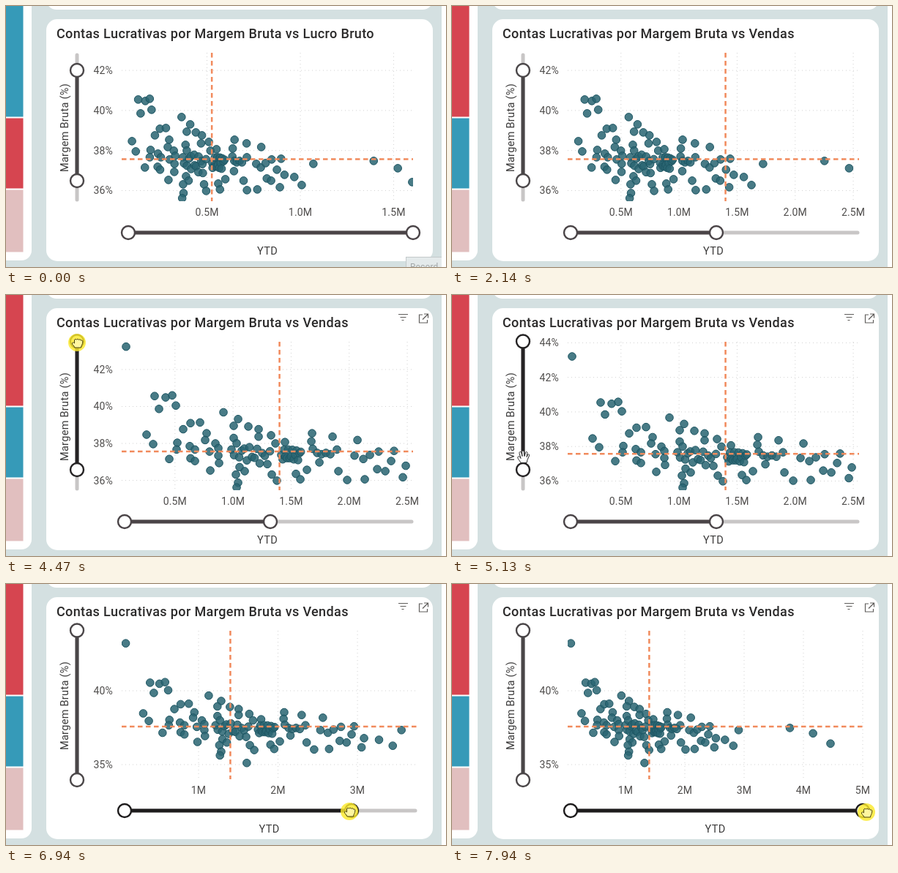
Write an HTML page that moves like this. It is 601 by 357 pixels and loops after 8 s.

```html
<!DOCTYPE html>
<html lang="pt">
<head>
<meta charset="utf-8">
<title>Contas Lucrativas</title>
<style>
html, body { margin: 0; width: 601px; height: 357px; overflow: hidden; background: #fff; }
svg { display: block; font: 14px Roboto, "Noto Sans", sans-serif; fill: #4f4d4c; letter-spacing: .15px; }
.title { font-size: 18px; font-weight: 500; letter-spacing: .36px; fill: #2b2a2a; }
.name { font-size: 14.5px; letter-spacing: .3px; fill: #3c3b3b; }
.grid { stroke: #d2d2d2; stroke-dasharray: 1 4; }
.mean { stroke: #f18a5c; stroke-width: 2.5; stroke-dasharray: 6.5 4.5; }
.rail { stroke: #c8c6c6; stroke-width: 5; stroke-linecap: round; }
.range { stroke-width: 5; }
.handle { fill: #fff; stroke-width: 2.4; }
.dot { fill: #2a6572; fill-opacity: .86; stroke: #1e5663; }
</style>
</head>
<body>
<svg width="601" height="357" viewBox="0 0 601 357">
  <defs><clipPath id="plot"><rect id="plotBox" x="158" y="64" width="398" height="203"/></clipPath></defs>
  <rect width="595" height="357" fill="#d4e0e1"/>
  <g fill="#fff">
    <rect x="-30" y="-30" width="65" height="378" rx="14"/>
    <rect x="55" y="-40" width="528" height="45" rx="14"/>
    <rect x="55" y="18" width="528" height="331" rx="15"/>
  </g>
  <rect id="tileA" width="23.5" height="151.5"/>
  <rect id="tileB" y="153.5" width="23.5" height="96"/>
  <rect y="251.5" width="23.5" height="85" fill="#e1bfbf"/>
  <text id="title" class="title" x="69" y="44"/>
  <g id="axes"></g>
  <g id="dots" clip-path="url(#plot)"></g>
  <g id="means"></g>
  <text class="name" text-anchor="middle" transform="translate(85 166.500) rotate(-90)">Margem Bruta (%)</text>
  <text id="xName" class="name" text-anchor="middle" y="340">YTD</text>
  <g id="sliders"></g>
  <g id="icons" fill="none" stroke="#605e5c" stroke-width="1.2">
    <path d="M536 26.500h13M538.500 30.500h8M540.500 34.500h3"/>
    <path d="M569 27h-4.500v11h11v-4M571 26h5.500v5.500M576 26.500l-7 7"/>
  </g>
  <g id="hint">
    <rect x="546.5" y="343.500" width="60" height="22" fill="#e4eaeb" stroke="#c3c9ca"/>
    <text x="552" y="361" font-size="12" fill="#a3a8a9">Record</text>
    <rect x="595" y="340" width="6" height="17" fill="#fff"/>
  </g>
  <g id="cursor">
    <circle id="press" r="12" fill="#fbe92c" fill-opacity=".82"/>
    <path id="arrow" d="M0 0v16.500l3.800-3.600 2.700 6.200 2.600-1.100-2.700-6.100h5.300z" fill="#fff" stroke="#222" stroke-linejoin="round"/>
    <path id="openHand" d="M-3 9C-5 5-8 3-7 1s3 0 4 2L-5-4c-.6-2 2-3 2.700-1L-1 0-1.500-6c0-2 2.600-2 2.800 0L2 0 3.500-5c.6-2 2.800-1 2.400.8L5 1 6.500-2c1-1.500 2.700-.5 2 1.200L6 5 5 9z" fill="#fff" stroke="#222"/>
    <path id="fist" d="M-3 7C-4 4-7 3-6.500 1s2-1 3 0V-3c0-2 2.500-2 3-.7 .5-1.600 2.600-1.400 3 .2 .8-1.400 2.600-.8 2.800.7 1.500-.8 2.700 0 2.500 1.800C7.700 3 5.500 4 5.500 7z" fill="#fff6a0" stroke="#4a430c"/>
  </g>
</svg>
<script>
const LOOP = 8000, FRAME = 200 / 3, SHIFT = 250;
const LEFT = 158, TOP = 64, BOTTOM = 267;
const MEAN_SALES = 1.4, MEAN_MARGIN = 37.57;
const $ = id => document.getElementById(id);

// Each view takes over at time t: axes jump, dots glide for SHIFT ms.
const firstView = { t: 0, profit: true, x0: .043, x1: 1.604, right: 556, y0: 35.47, y1: 42.88 };
const views = [firstView];
const addView = change => views.push({ ...views[views.length - 1], ...change });
addView({ t: 2086, profit: false, x0: .041, x1: 2.55 });
addView({ t: 4270, y1: 43.5 });
addView({ t: 4480, y1: 44.06 });
addView({ t: 5540, y0: 34.7 });
addView({ t: 5770, y0: 34.01 });
addView({ t: 6811, x0: .032, x1: 3.746, right: 561 });
addView({ t: 7739, x0: .025, x1: 5 });

// Points of the scatter as placed on the 2.5M sales axis.
const spots = [
  [164, 55], [192, 185], [201, 199], [203, 128], [209, 147], [218, 130], [227, 127], [232, 142],
  [223, 221], [234, 197], [233, 207], [242, 177], [252, 168], [265, 167], [251, 202], [252, 220],
  [258, 207], [258, 224], [274, 183], [272, 193], [278, 210], [279, 238], [286, 198], [290, 205],
  [290, 216], [291, 227], [297, 152], [317, 162], [311, 172], [331, 173], [311, 190], [345, 177],
  [345, 188], [362, 186], [368, 198], [319, 233], [326, 239], [314, 244], [317, 256], [315, 263],
  [363, 244], [370, 253], [381, 196], [396, 243], [411, 237], [402, 251], [418, 183], [417, 195],
  [419, 206], [428, 226], [446, 188], [452, 207], [454, 239], [466, 252], [480, 193], [476, 216],
  [488, 221], [497, 215], [490, 251], [507, 236], [509, 210], [526, 224], [530, 209], [518, 239],
  [546, 231], [542, 248], [570, 234], [592, 245], [606, 216], [741, 212], [802, 222], [848, 241],
  [358, 277]
];
// Dense middle of the cloud.
for (let i = 0; i < 16; i++) spots.push([308 + 3.5 * i, 207 + .9 * i + 11 * Math.sin(2.4 * i)]);
for (let i = 0; i < 15; i++) spots.push([376 + 1.9 * i, 215 + 8 * Math.sin(2.2 * i)]);
for (let i = 0; i < 4; i++) spots.push([425 + 6 * i, 212 + i % 2 * 2]);

const accounts = spots.map(([x, y]) => ({ sales: (x - 151.5) / 158.6, margin: 40 - (y - 143) / 27.4 }));
const dots = accounts.map(() => {
  const dot = document.createElementNS('http://www.w3.org/2000/svg', 'circle');
  dot.setAttribute('class', 'dot');
  dot.setAttribute('r', 5.3);
  return $('dots').appendChild(dot);
});

const mix = (a, b, p) => a + (b - a) * p;
const cubicInOut = p => p < .5 ? 4 * p ** 3 : 1 - 4 * (1 - p) ** 3;
const xAt = (view, v) => mix(LEFT, view.right, (v - view.x0) / (view.x1 - view.x0));
const yAt = (view, v) => mix(BOTTOM, TOP, (v - view.y0) / (view.y1 - view.y0));
const place = (view, { sales, margin }) =>
  [xAt(view, view.profit ? sales * margin / 100 : sales), yAt(view, margin)];
const show = (id, on) => $(id).setAttribute('display', on ? 'inline' : 'none');
const within = (t, ...spans) => spans.some(([a, b]) => t >= a && t < b);

// Keys are [time, ...values]; values are linear between keys.
function track(keys, t) {
  const next = keys.findIndex(key => key[0] > t);
  if (next === 0) return keys[0].slice(1);
  if (next < 0) return keys[keys.length - 1].slice(1);
  const a = keys[next - 1], b = keys[next];
  return a.slice(1).map((v, i) => mix(v, b[i + 1], (t - a[0]) / (b[0] - a[0])));
}

const crossing = [[333, 566, 338], [467, 60, 110]];
const pointer = [
  [3600, 51, 147], [3950, 97, 88], [4050, 97, 88], [4450, 97, 65], [4650, 97, 65], [5100, 97, 233],
  [5400, 97, 239], [5750, 97, 267], [5850, 97, 267], [6133, 351, 316], [6400, 361, 311],
  [6933, 469, 311], [7650, 566, 312]
];
const topHandle = [[4050, 88], [4450, 63.5]];
const bottomHandle = [[5400, 239], [5750, 268]];
const rightHandle = [[6400, 361], [6933, 472], [7650, 561]];

const line = (cls, x1, y1, x2, y2, color = '') =>
  `<line class="${cls}" x1="${x1}" y1="${y1}" x2="${x2}" y2="${y2}"${color && ` stroke="${color}"`}/>`;
const knob = (x, y, color) => `<circle class="handle" cx="${x}" cy="${y}" r="9" stroke="${color}"/>`;

function ticks(from, to, step) {
  const list = [];
  for (let i = Math.ceil(from / step); i * step <= to + 1e-6; i++) list.push(i * step);
  return list;
}

function drawAxes(view) {
  const xStep = view.x1 < 3 ? .5 : 1, yStep = view.y1 - view.y0 < 9 ? 2 : 5;
  let svg = '';
  for (const v of ticks(view.x0, view.x1, xStep)) {
    const x = xAt(view, v);
    svg += line('grid', x, TOP, x, BOTTOM)
      + `<text x="${x}" y="287" text-anchor="middle">${v.toFixed(xStep < 1 ? 1 : 0)}M</text>`;
  }
  for (const v of ticks(view.y0, view.y1, yStep)) {
    const y = yAt(view, v);
    svg += line('grid', LEFT, y, view.right, y) + `<text x="146" y="${y + 5}" text-anchor="end">${v}%</text>`;
  }
  $('axes').innerHTML = svg;
  const [mx, my] = place(view, { sales: MEAN_SALES, margin: MEAN_MARGIN });
  $('means').innerHTML = line('mean', mx, TOP, mx, BOTTOM) + line('mean', LEFT, my, view.right, my);
}

function drawSliders(t, view) {
  const [top] = track(topHandle, t), [bottom] = track(bottomHandle, t);
  const left = view.profit ? 167 : 162;
  const right = view.profit ? 556 : track(rightHandle, t)[0];
  const yColor = within(t, [3900, 5800]) ? '#252324' : '#4a4648';
  const xColor = t >= 6100 ? '#1d1b1c' : '#4a4447';
  $('sliders').innerHTML =
    line('rail', 97, 67, 97, 265) + line('range', 97, top, 97, bottom, yColor)
    + knob(97, top, yColor) + knob(97, bottom, yColor)
    + line('rail', left, 310, view.right - 2, 310) + line('range', left, 310, right, 310, xColor)
    + knob(left, 310, xColor) + knob(right, 310, xColor);
}

function drawCursor(t) {
  const passing = within(t, [333, 530]);
  const [x, y] = track(passing ? crossing : pointer, t);
  const pressed = within(t, [4050, 4600], [5350, 5800], [6350, LOOP]);
  const hand = within(t, [3900, 4700], [5050, 5880], [6100, LOOP]);
  show('cursor', passing || t >= 3599);
  show('icons', passing || t >= 3660);
  show('press', pressed);
  show('fist', pressed);
  show('openHand', hand && !pressed);
  show('arrow', !hand);
  $('cursor').setAttribute('transform', `translate(${x} ${y})`);
}

function render(time) {
  const t = Math.floor(time / FRAME + 1e-6) * FRAME;
  const index = views.findLastIndex(view => view.t <= t);
  const view = views[index], before = views[Math.max(0, index - 1)];
  const p = cubicInOut(Math.min(1, (t - view.t) / SHIFT));

  $('title').textContent = 'Contas Lucrativas por Margem Bruta vs ' + (view.profit ? 'Lucro Bruto' : 'Vendas');
  $('tileA').setAttribute('fill', view.profit ? '#369ab8' : '#d64550');
  $('tileB').setAttribute('fill', view.profit ? '#d64550' : '#369ab8');
  $('plotBox').setAttribute('width', view.right - LEFT);
  $('xName').setAttribute('x', (LEFT + view.right) / 2);
  show('hint', t < 60);
  drawAxes(view);
  accounts.forEach((account, i) => {
    const [x0, y0] = place(before, account), [x1, y1] = place(view, account);
    dots[i].setAttribute('cx', mix(x0, x1, p));
    dots[i].setAttribute('cy', mix(y0, y1, p));
  });
  drawSliders(t, view);
  drawCursor(t);
}

const start = performance.now();
function loop() {
  render((performance.now() - start) % LOOP);
  requestAnimationFrame(loop);
}
loop();
</script>
</body>
</html>
```
